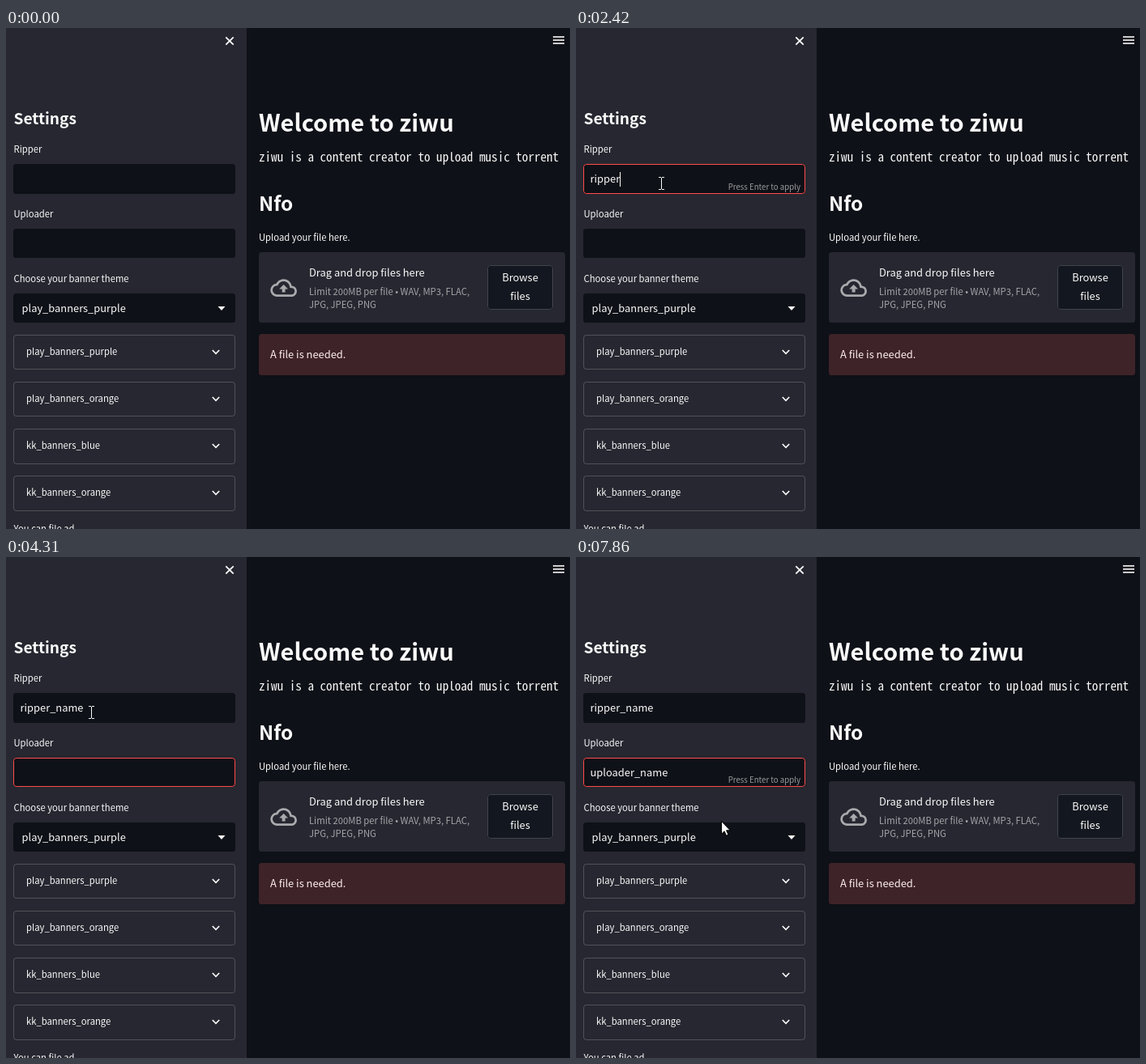
Animation, 696 px wide and 619 px high, one loop 8000 ms. Source, as an HTML page with a canvas:

```html
<!DOCTYPE html>
<html lang="en">
<head>
<meta charset="utf-8">
<title>Upload settings</title>
<style>
  html, body { margin: 0; width: 100%; height: 100%; overflow: hidden; background: #0e1117; }
  canvas { display: block; width: 696px; height: 619px; }
</style>
</head>
<body>
<canvas id="stage" width="696" height="619"></canvas>
<script>
const ctx = document.getElementById('stage').getContext('2d', { alpha: false });
const LOOP = 8000;
const DARK = '#0e1117', PANEL = '#262730', INK = '#fafafa';
const DIM = 'rgba(250,250,250,.6)', LINE = 'rgba(250,250,250,.2)';
const SANS = '"Noto Sans CJK JP", "Noto Sans CJK SC", "Open Sans", sans-serif';
const MONO = '"Noto Sans Mono CJK JP", "Noto Sans Mono CJK SC", "Noto Sans Mono", monospace';
const SCALE = 0.895; // CJK Latin glyphs are drawn larger on the em

const cloud = new Path2D('M19.35 10.04A7.49 7.49 0 0 0 12 4C9.11 4 6.6 5.64 5.35 8.04A5.994 5.994 0 0 0 0 14c0 3.31 2.69 6 6 6h13c2.76 0 5-2.24 5-5 0-2.64-2.05-4.78-4.65-4.96zM19 18H6c-2.21 0-4-1.79-4-4 0-2.05 1.53-3.76 3.56-3.97l1.07-.11.5-.95A5.469 5.469 0 0 1 12 6c2.62 0 4.88 1.86 5.39 4.43l.3 1.5 1.53.11A2.98 2.98 0 0 1 22 15c0 1.65-1.35 3-3 3zM8 13h2.55v3h2.9v-3H16l-4-4z');
const chair = new Path2D('M20 4.54a2 2 0 1 1-4 0a2 2 0 1 1 4 0zM15 17h-2c0 1.65-1.35 3-3 3s-3-1.35-3-3 1.35-3 3-3v-2c-2.76 0-5 2.24-5 5s2.24 5 5 5 5-2.24 5-5zm3-3.5h-1.86l1.67-3.67C18.42 8.5 17.44 7 15.96 7h-5.2c-.81 0-1.54.47-1.87 1.2L8.22 10l1.92.53.65-1.53H13l-1.83 4.1c-.6 1.33.39 2.9 1.85 2.9H18v5h2v-5.5c0-1.1-.9-2-2-2z');
const arrow = new Path2D('M0.5 0.5V16.2L4.1 12.8L6.5 18.2L9 17.1L6.6 11.8H11.3Z');

// Key times of each typed character, and the spans in which the caret is lit.
const fields = [
  { y: 168, h: 37, base: 191, caretY: 178, text: 'ripper_name', focus: 900, blur: 3770,
    keys: [1620, 1820, 2020, 2220, 2350, 2420, 2690, 2960, 3110, 3240, 3430] },
  { y: 248, h: 36, base: 271, caretY: 257, text: 'uploader_name', focus: 3770, blur: LOOP,
    keys: [4450, 4720, 4850, 4980, 5120, 5320, 5460, 5590, 6250, 6520, 6650, 6850, 6980] }
];

const clamp = v => Math.max(0, Math.min(1, v));

function text(str, x, y, size, color = INK, weight = 400, align = 'left') {
  ctx.font = `${weight} ${size * SCALE}px ${SANS}`;
  ctx.textAlign = align;
  ctx.fillStyle = color;
  ctx.fillText(str, x, y);
}

function mono(str, x, y, advance) {
  ctx.font = `100px ${MONO}`;
  const size = advance * 100 / ctx.measureText('0').width;
  ctx.font = `${size}px ${MONO}`;
  ctx.textAlign = 'left';
  ctx.fillStyle = INK;
  ctx.fillText(str, x, y);
}

function box(x, y, w, h, fill, stroke) {
  ctx.beginPath();
  if (fill) {
    ctx.roundRect(x, y, w, h, 3.6);
    ctx.fillStyle = fill;
    ctx.fill();
  }
  if (stroke) {
    ctx.beginPath();
    ctx.roundRect(x + .5, y + .5, w - 1, h - 1, 3.2);
    ctx.strokeStyle = stroke;
    ctx.lineWidth = 1;
    ctx.stroke();
  }
}

function stroke(points, width, color = INK) {
  ctx.beginPath();
  points.forEach(([x, y], i) => i ? ctx.lineTo(x, y) : ctx.moveTo(x, y));
  ctx.strokeStyle = color;
  ctx.lineWidth = width;
  ctx.stroke();
}

function icon(path, x, y, scale, color) {
  ctx.save();
  ctx.translate(x, y);
  ctx.scale(scale, scale);
  ctx.fillStyle = color;
  ctx.fill(path);
  ctx.restore();
}

function sidebar() {
  ctx.fillStyle = PANEL;
  ctx.fillRect(0, 0, 297, 619);
  stroke([[271.3, 11.3], [280.7, 20.7]], 1.8);
  stroke([[280.7, 11.3], [271.3, 20.7]], 1.8);
  text('Settings', 9.5, 119, 21.4, INK, 600);
  text('Ripper', 9.5, 154, 12.6);
  text('Uploader', 9.5, 234, 12.6);
  text('Choose your banner theme', 9.5, 314, 12.6);

  box(9, 328, 274, 36, DARK);
  text('play_banners_purple', 19.5, 351, 14.4);
  ctx.beginPath();
  ctx.moveTo(261.5, 344);
  ctx.lineTo(270.5, 344);
  ctx.lineTo(266, 349);
  ctx.fill();

  const themes = ['play_banners_purple', 'play_banners_orange', 'kk_banners_blue', 'kk_banners_orange'];
  themes.forEach((name, i) => {
    const y = Math.round(378.8 + i * 58.2);
    box(9, y, 274, i < 2 ? 43 : 44, null, LINE);
    text(name, 25, y + 25, 12.6);
    stroke([[254.8, y + 19], [259, y + 23.3], [263.2, y + 19]], 1.7);
  });
  text('You can file ad', 9.5, 623, 12.6);
}

function mainPane() {
  for (const y of [11, 15, 19]) stroke([[675, y], [689, y]], 1.6);
  text('Welcome to ziwu', 312, 128, 32.5, INK, 700);
  mono('ziwu is a content creator to upload music torrent', 312, 165, 7.56);
  text('Nfo', 312, 226, 27.2, INK, 600);
  text('Upload your file here.', 312, 263, 12.6);

  box(312, 277, 378, 87, PANEL);
  icon(cloud, 326.3, 304.8, 1.36, 'rgba(250,250,250,.62)');
  text('Drag and drop files here', 374, 307, 14.4);
  text('Limit 200MB per file • WAV, MP3, FLAC,', 374, 330, 12.6, DIM);
  text('JPG, JPEG, PNG', 374, 346, 12.6, DIM);
  box(594, 293, 81, 55, '#13171f', '#41444b');
  text('Browse', 634.5, 313, 14.4, INK, 400, 'center');
  text('files', 634.5, 336, 14.4, INK, 400, 'center');

  box(312, 378, 378, 51, '#3e2328');
  text('A file is needed.', 326, 408, 14.4, '#fdeeee');
}

function field(f, t) {
  const active = t >= f.focus && t < f.blur;
  const count = f.keys.filter(k => k <= t).length;
  const typed = f.text.slice(0, count);
  box(9, f.y, 274, f.h, DARK);
  if (active) {
    const fade = clamp((t - f.focus + 70) / 200);
    box(9, f.y, 274, f.h, null, `rgba(255,75,75,${fade})`);
  }
  text(typed, 17.5, f.base, 14.4);
  if (!active) return;
  const last = count ? f.keys[count - 1] : f.focus;
  if ((t - last) % 1060 < 530) {
    const x = count ? Math.round(17 + ctx.measureText(typed).width) : 18;
    ctx.fillStyle = INK;
    ctx.fillRect(x, f.caretY, 1, 18);
  }
  if (count) text('Press Enter to apply', 277, f.y + (f.y < 200 ? 32 : 31), 10.8, DIM, 400, 'right');
}

function status(t) {
  if (t < 3840 || t >= 4110) return;
  ctx.globalAlpha = t < 3910 ? .6 : 1;
  icon(chair, 516.5, 3.6, 1, 'rgba(250,250,250,.4)');
  text('RUNNING...', 547, 19, 12.6, DIM);
  text('Stop', 625.5, 19, 12.6);
  ctx.globalAlpha = 1;
}

function along(points, u) {
  const p = clamp(u) * (points.length - 1);
  const i = Math.min(Math.floor(p), points.length - 2);
  const [a, b] = [points[i], points[i + 1]];
  return [0, 1].map(k => Math.round(a[k] + (b[k] - a[k]) * (p - i)));
}

const enter = [[566, 600], [470, 505], [370, 415], [275, 330], [185, 255], [120, 205], [95, 188], [105, 191]];
const leave = [[105, 191], [108, 174], [120, 172], [137, 192], [153, 228], [165, 268], [174, 303], [178, 321], [179, 326]];

function pointer(t) {
  if (t < 70) return;
  const [x, y] = t < 7380
    ? along(enter, Math.floor((t - 70) / 76) / 10)
    : along(leave, (Math.floor((t - 7380) / 68.5) + 1) / 8);
  const overField = x >= 9 && x < 283 && fields.some(f => y >= f.y && y < f.y + f.h);
  if (overField) {
    ctx.fillStyle = INK;
    ctx.fillRect(x, y - 6, 1, 14);
    for (const edge of [y - 7, y + 8]) {
      ctx.fillRect(x - 3, edge, 3, 1);
      ctx.fillRect(x + 1, edge, 3, 1);
    }
    return;
  }
  ctx.save();
  ctx.translate(x, y);
  ctx.fillStyle = '#fff';
  ctx.strokeStyle = '#000';
  ctx.lineWidth = 1;
  ctx.fill(arrow);
  ctx.stroke(arrow);
  ctx.restore();
}

function draw(now) {
  const t = now % LOOP;
  ctx.fillStyle = DARK;
  ctx.fillRect(0, 0, 696, 619);
  sidebar();
  mainPane();
  fields.forEach(f => field(f, t));
  status(t);
  pointer(t);
}

let start;
function tick(now) {
  start ??= now;
  draw(now - start);
  requestAnimationFrame(tick);
}
requestAnimationFrame(tick);
</script>
</body>
</html>
```
